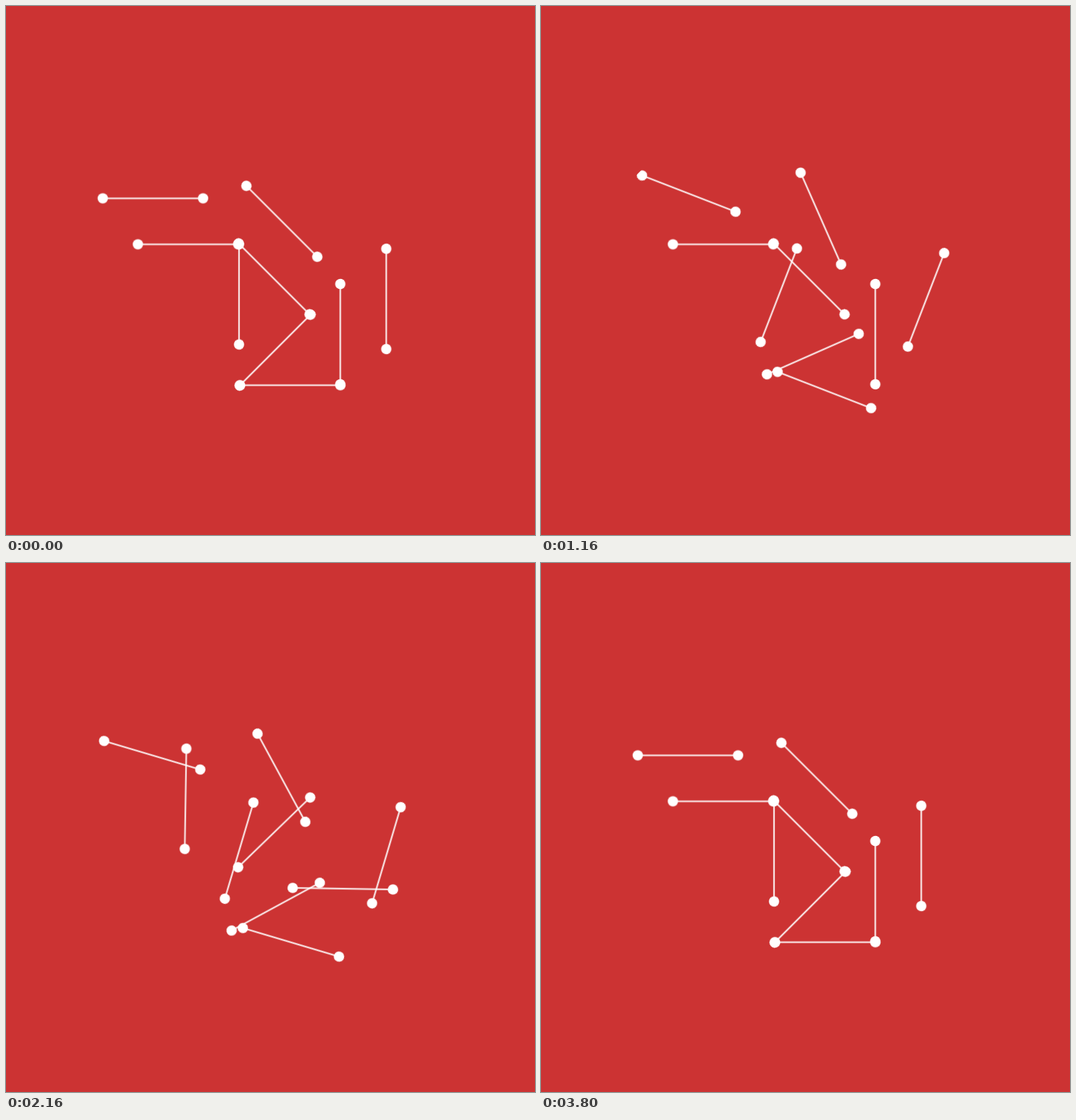
An HTML page for the animation above (3.84 s loop, 748 by 748 pixels).

```html
<!DOCTYPE html>
<html lang="en">
<head>
<meta charset="utf-8">
<title>Spinning rods</title>
<style>
  html, body {
    margin: 0;
    width: 100%;
    height: 100%;
    overflow: hidden;
    background: #cc3333;
  }
  svg {
    display: block;
    width: 748px;
    height: 748px;
    clip-path: polygon(50% 0, 100% 50%, 50% 100%, 0 50%);
  }
  .first, .second {
    transform-origin: 0 0;
    animation: 3840ms linear infinite;
  }
  .first { animation-name: spin-left; }
  .second { animation-name: spin-right; }

  /* 37 ms to 2477 ms */
  @keyframes spin-left {
    0% { transform: rotate(0deg); }
    0.964% { transform: rotate(0deg); animation-timing-function: cubic-bezier(.3333, 0, .6667, 1); }
    64.505%, 100% { transform: rotate(-360deg); }
  }
  /* 1360 ms to 3800 ms */
  @keyframes spin-right {
    0% { transform: rotate(0deg); }
    35.417% { transform: rotate(0deg); animation-timing-function: cubic-bezier(.3333, 0, .6667, 1); }
    98.958%, 100% { transform: rotate(360deg); }
  }
</style>
</head>
<body>
<svg viewBox="0 0 748 748">
  <defs>
    <!-- The rod lies slightly off its pivot -->
    <g id="rod" fill="#fff">
      <path d="M-70.9 3.5H70.9" stroke="#fff" stroke-width="1.8"/>
      <circle cx="-70.9" cy="3.5" r="7.3"/>
      <circle cx="70.9" cy="3.5" r="7.3"/>
    </g>
  </defs>

  <g transform="translate(207.7 268.5)"><g class="first"><use href="#rod"/></g></g>
  <g transform="translate(392.5 302) rotate(45)"><g class="first"><use href="#rod"/></g></g>
  <g transform="translate(333 407.7) rotate(90)"><g class="first"><use href="#rod"/></g></g>
  <g transform="translate(383 489) rotate(135)"><g class="first"><use href="#rod"/></g></g>
  <g transform="translate(401.9 539.7) rotate(180)"><g class="first"><use href="#rod"/></g></g>
  <g transform="translate(541.2 414.2) rotate(90)"><g class="first"><use href="#rod"/></g></g>

  <g transform="translate(257.4 333.5)"><g class="second"><use href="#rod"/></g></g>
  <g transform="translate(381.6 383.4) rotate(45)"><g class="second"><use href="#rod"/></g></g>
  <g transform="translate(476.2 464) rotate(90)"><g class="second"><use href="#rod"/></g></g>
</svg>
</body>
</html>
```
